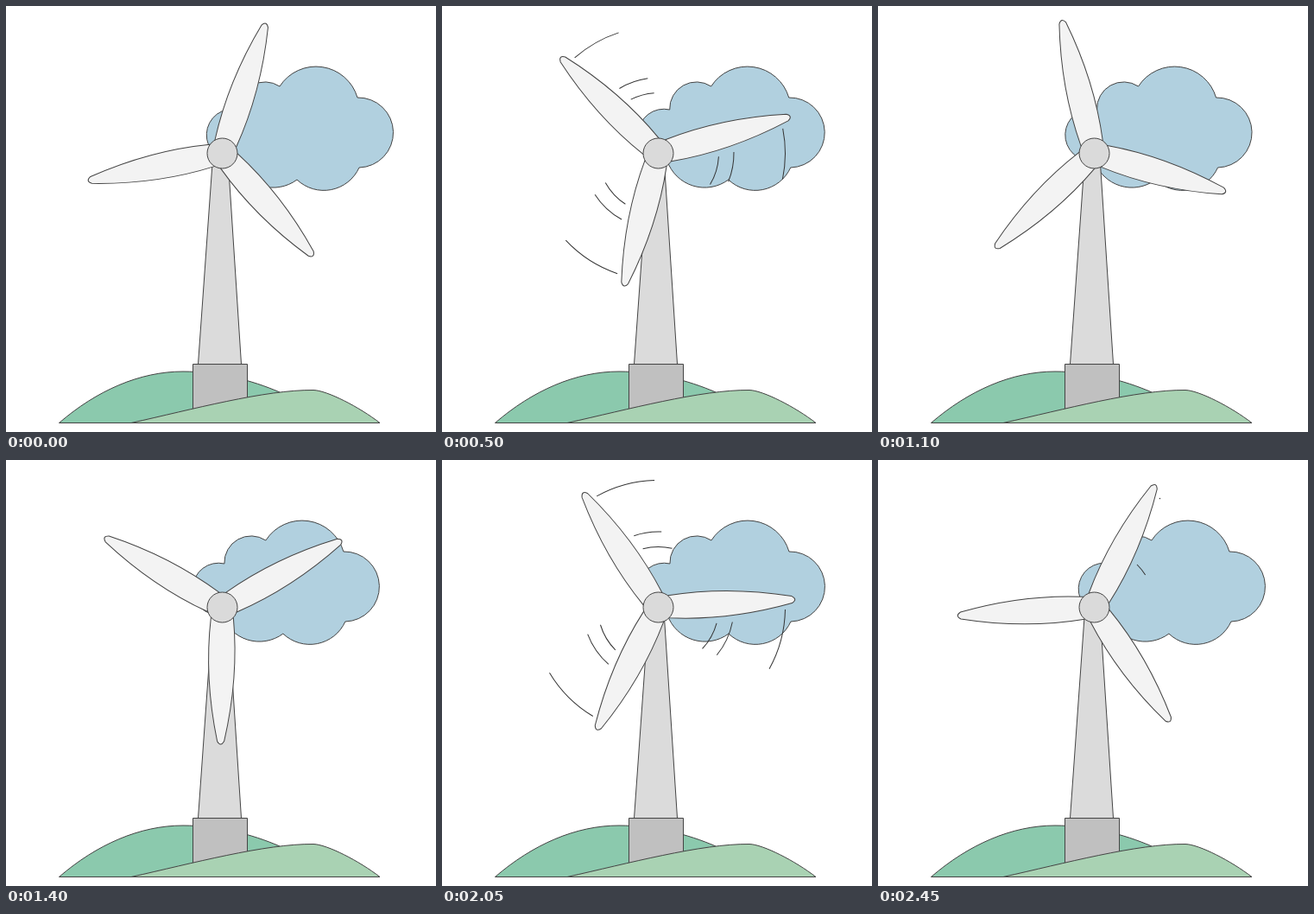
Write an HTML page that moves like this. It is 498 px wide and 493 px high and loops after 2.5 s.

```html
<!DOCTYPE html>
<html lang="en">
<head>
<meta charset="utf-8">
<title>Wind turbine</title>
<style>
  html, body { margin: 0; height: 100%; overflow: hidden; background: #fff; }
  svg { display: block; width: 498px; height: 493px; }
  svg * { stroke: #444; stroke-width: 1; stroke-linejoin: round; }
  .trail { fill: none; stroke: #333; }
</style>
</head>
<body>
<svg viewBox="0 0 498 493">
  <path id="cloud" fill="#b1d0df" d="M269 120A31 31 0 0 1 317 93A50 50 0 0 1 407 106A40.5 40.5 0 0 1 409 187A45 45 0 0 1 337 201A46 46 0 0 1 266 179A30 30 0 1 1 269 120Z"/>
  <path fill="#8bc9ad" d="M61.500 482.500C105 445 155 423 205 423C245 423 285 433 317 447L330 482.500Z"/>
  <path fill="#dbdbdb" d="M239.500 175H257L272.500 414.500H222.500Z"/>
  <path fill="#c0c0c0" d="M216.500 414.500H279.500V475H216.500Z"/>
  <path fill="#a9d2b3" d="M145 482.500C215 467 300 444 356 444.500C372 445 409 464 433 482.500Z"/>
  <g id="rotor"></g>
  <circle cx="250.500" cy="170.500" r="17.500" fill="#dadada"/>
</svg>
<script>
const LOOP = 2500, STEP = 50, PULSE = 850, TRAIL = 28;

// Degrees the rotor lags behind a steady turn, as [time, lag]
const LAG = [[0, 0], [250, 8.1], [750, 7.9], [1100, 6.2], [1650, 1.8], [2050, 3.4], [2450, .8], [2500, 0]];

// Per trail: radius, angle behind the blade, pulse start times for each blade
const TRAILS = [
  { r: 147, gap: 4.3, starts: [[260, 1660], [65, 1470], [260, 1620]] },
  { r: 87.5, gap: 14.5, starts: [[260, 1640], [125, 1428], [260, 1543]] },
  { r: 70, gap: 18.5, starts: [[260, 1770], [-30, 1556], [125, 1620]] }
];

const rotor = document.getElementById('rotor');
const cloud = document.getElementById('cloud');

function add(parent, tag, attrs) {
  const el = document.createElementNS('http://www.w3.org/2000/svg', tag);
  for (const name in attrs) el.setAttribute(name, attrs[name]);
  return parent.appendChild(el);
}

const blades = [0, 1, 2].map(() => {
  const group = add(rotor, 'g', {});
  const trails = TRAILS.map(() => add(group, 'path', { class: 'trail' }));
  add(group, 'path', {
    fill: '#f3f3f3',
    d: 'M-13-12C-18-60-15-105-4-155Q0-162 4-155C15-105 18-60 13-12Z'
  });
  return { group, trails };
});

function lagAt(t) {
  const i = LAG.findIndex(([time]) => time > t);
  const [t0, a] = LAG[i - 1], [t1, b] = LAG[i];
  return a + (b - a) * (t - t0) / (t1 - t0);
}

function pulse(u) {
  if (u <= 0 || u >= 1) return 0;
  return Math.min(1, Math.max(0, 1.45 * Math.sin(Math.PI * u) ** 2 - .05));
}

function point(r, degrees) {
  const a = degrees * Math.PI / 180;
  return `${r * Math.sin(a)} ${-r * Math.cos(a)}`;
}

function draw(t) {
  const drift = t < 1300 ? t / 1300 : (LOOP - t) / 1200;
  cloud.setAttribute('transform', `translate(${-8.2 * (1 - Math.cos(Math.PI * drift))})`);

  const angle = 18.5 - 360 * t / LOOP + lagAt(t);
  blades.forEach(({ group, trails }, k) => {
    group.setAttribute('transform', `translate(250.500 170.500) rotate(${angle - 120 * k})`);
    TRAILS.forEach(({ r, gap, starts }, i) => {
      const length = TRAIL * Math.max(...starts[k].map(s => pulse((t - s) / PULSE)));
      trails[i].setAttribute('d', length
        ? `M${point(r, gap)}A${r} ${r} 0 0 1 ${point(r, gap + length)}` : '');
    });
  });
}

function tick() {
  draw(Math.floor(performance.now() % LOOP / STEP) * STEP);
  requestAnimationFrame(tick);
}
tick();
</script>
</body>
</html>
```
